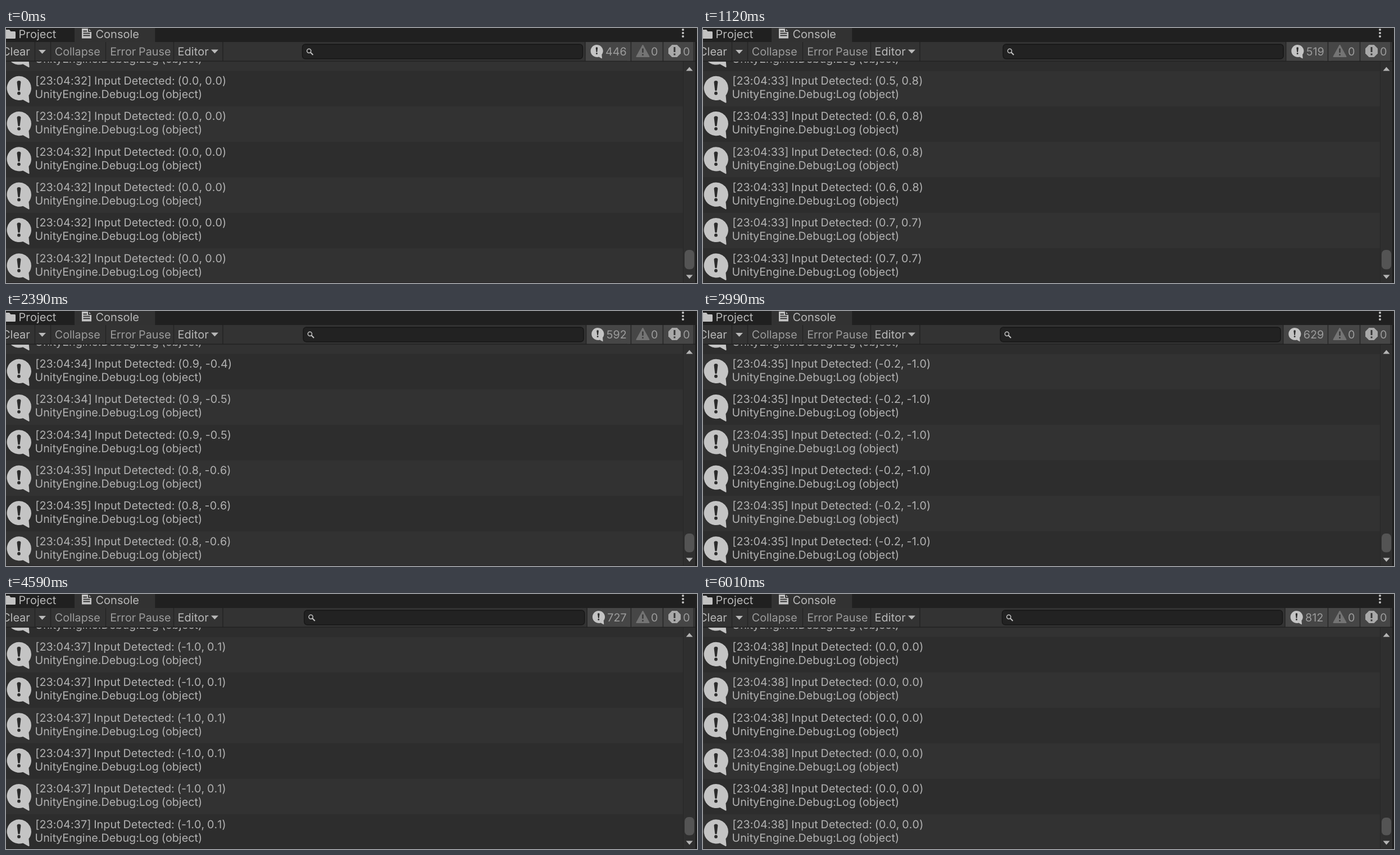
Animation of 1230 by 455 pixels, one loop 6270 ms. Source, as an HTML page:

```html
<!DOCTYPE html>
<html lang="en">
<head>
<meta charset="utf-8">
<title>Console</title>
<style>
  html, body { margin: 0; width: 100%; height: 100%; overflow: hidden; background: #2d2d2d; }
  svg { display: block; width: 1230px; height: 455px; }
  text {
    font-family: Inter, "Noto Sans", sans-serif;
    font-size: 20px;
    font-optical-sizing: none;
    font-kerning: none;
    font-feature-settings: "calt" 0;
    word-spacing: -0.8px;
    fill: #b9b9b9;
    white-space: pre;
    text-rendering: geometricPrecision;
  }
  .log text { font-size: 19.75px; fill: #b2b2b2; }
  .log .message { letter-spacing: 0.06px; }
  .dim text, text.dim { font-size: 19.8px; fill: #9c9c9c; }
</style>
</head>
<body>
<svg id="stage" viewBox="0 0 1230 455" xmlns="http://www.w3.org/2000/svg">
  <defs>
    <clipPath id="list"><rect x="0" y="60" width="1205" height="395"/></clipPath>
    <g id="bubble">
      <path fill="#c4c4c4" d="M0-21.7a22 21.6 0 0 1 17.5 34.6L18.6 25.2Q18.4 26.6 17 26L7.2 20.5A22 21.6 0 1 1 0-21.7z"/>
      <path fill="#2c2c2c" d="M-3.4-10.5Q-3.4-13.4 0-13.4T3.4-10.5L1.7 3.4Q1.5 4.6 0 4.6T-1.7 3.4z"/>
      <circle cy="9.1" r="2.9" fill="#2c2c2c"/>
    </g>
  </defs>
  <rect width="1230" height="455" fill="#2d2d2d"/>
  <g id="rows" class="log" clip-path="url(#list)"></g>
  <rect y="454" width="1230" height="1" fill="#262425"/>

  <!-- tabs -->
  <rect width="1230" height="25" fill="#202020"/>
  <path d="M122 25V0H265.300V25z" fill="#323232"/>
  <path d="M-2 3H6L8.500 6H15.500Q17 6 17 7.500V17.500Q17 19 15.500 19H-2z" fill="#c2c2c2"/>
  <text x="22.600" y="17.500">Project</text>
  <path d="M135 1H147L152 6V18.500H135z" fill="#c4c4c4"/>
  <path d="M147 0V6H153M137.500 5.500H144M137.500 9.500H149.500M137.500 13.500H149.500" fill="none" stroke="#323232" stroke-width="1.900"/>
  <text x="159.500" y="17.500">Console</text>
  <g fill="#c4c4c4"><circle cx="1205" cy="3" r="2"/><circle cx="1205" cy="9" r="2"/><circle cx="1205" cy="15" r="2"/></g>

  <!-- toolbar -->
  <rect y="25" width="1230" height="34" fill="#333"/>
  <rect y="58.500" width="1230" height="1.500" fill="#222"/>
  <text x="-7" y="49.200">Clear</text>
  <path d="M58 39H71L64.500 46z" fill="#b9b9b9"/>
  <g class="dim"><text x="86.700" y="49.200">Collapse</text><text x="185.200" y="49.200">Error Pause</text></g>
  <text x="305.600" y="49.200">Editor</text>
  <path d="M365 38.500H378L371.500 45.500z" fill="#b9b9b9"/>
  <path d="M51.500 25V59M79.500 25V59M177.500 25V59M298.500 25V59M386 25V59" stroke="#232323" stroke-width="1.300"/>

  <g id="search">
    <rect x="527.500" y="29" width="499" height="26" rx="5.500" fill="#222" stroke="#161616" stroke-width="1.400"/>
    <path d="M542 43.500L546.500 48" stroke="#c4c4c4" stroke-width="2"/>
    <circle cx="539.300" cy="40.800" r="3.600" fill="none" stroke="#c4c4c4" stroke-width="1.500"/>
    <path d="M1031 25H1112V58.500H1031z" fill="#464646"/>
    <path d="M1031 25V59" stroke="#232323" stroke-width="1.400"/>
    <use href="#bubble" transform="translate(1051.500 41) scale(.51)"/>
    <text id="count" class="dim" x="1067" y="49.200"></text>
  </g>
  <rect x="1106" y="25" width="117" height="33.500" fill="#464646"/>
  <path d="M1112.500 25V59M1169.500 25V59" stroke="#232323" stroke-width="1.400"/>
  <path d="M1133.500 31L1144.500 51H1122.500z" fill="#747474" stroke="#747474" stroke-width="2" stroke-linejoin="round"/>
  <path d="M1133.500 36.500V44M1133.500 46.500V49" stroke="#3a3a3a" stroke-width="2.600"/>
  <path d="M1185.500 30H1194.500L1201 36.500V45.500L1194.500 52H1185.500L1179 45.500V36.500z" fill="#a9a9a9"/>
  <path d="M1190 34V43M1190 45.500V48.500" stroke="#363636" stroke-width="3"/>
  <g class="dim"><text x="1148" y="49.200">0</text><text x="1205" y="49.200">0</text></g>

  <!-- scrollbar -->
  <rect x="1205" y="60" width="22" height="394" fill="#2f2f2f"/>
  <path d="M1205.500 60V454" stroke="#262626"/>
  <path d="M1210.500 76.500H1222.500L1216.500 69.500zM1210.500 440.500H1222.500L1216.500 447.500z" fill="#b4b4b4"/>
  <rect id="thumb" x="1208" width="17" rx="7" fill="#545454"/>
  <rect x="1227" y="25" width="3" height="430" fill="#1c1c1c"/>
</svg>
<script>
const LOOP = 6270, TICK = 200, FIRST = 446, PER_TICK = 12.2, PITCH = 63.3;
const POINT = 5 / 3; // pixels per layout point

const NS = "http://www.w3.org/2000/svg";
const $ = id => document.getElementById(id);

function add(parent, tag, attrs, content = "") {
  const el = document.createElementNS(NS, tag);
  for (const name in attrs) el.setAttribute(name, attrs[name]);
  el.textContent = content;
  return parent.appendChild(el);
}

const rows = [];
for (let i = -1; i < 6; i++) {
  const g = add($("rows"), "g", { transform: `translate(0 ${76.6 + i * PITCH})` });
  const back = add(g, "rect", { width: 1205, height: PITCH + 0.3 });
  add(g, "use", { href: "#bubble", transform: "translate(23 30.8)" });
  const line = add(g, "text", { class: "message", x: 52.2, y: 24.5 });
  add(g, "text", { x: 51.5, y: 48.6 }, "UnityEngine.Debug:Log (object)");
  rows.push({ back, line });
}

const ramp = (x, from, to) => Math.min(1, Math.max(0, (x - from) / (to - from)));
const fixed = v => v.toFixed(1).replace("-0.0", "0.0");

// The stick is pushed up, turned clockwise side by side, spun and let go.
function message(entry) {
  const push = ramp(entry, 458, 464) - ramp(entry, 784, 788);
  const turns = ramp(entry, 506, 540) + ramp(entry, 582, 612) + ramp(entry, 640, 664);
  const spin = 13 * Math.max(0, entry - 738.75);
  const angle = (79 - 89 * turns - spin) * Math.PI / 180;
  const second = 33 + Math.floor((entry - 470) / 60);
  const x = fixed(push * Math.cos(angle)), y = fixed(push * Math.sin(angle));
  return `[23:04:${second}] Input Detected: (${x}, ${y})`;
}

// Ticks are even apart from two short stalls.
function tickAt(t) {
  const stall = 70 * ramp(t, 2100, 2170) + 20 * ramp(t, 5390, 5410);
  return Math.floor((t + 80 - stall) / TICK);
}

let shown = -1;
function draw(time) {
  const tick = tickAt(time % LOOP);
  if (tick === shown) return;
  shown = tick;

  const count = FIRST + Math.round(tick * PER_TICK);
  rows.forEach(({ back, line }, i) => {
    const entry = count - 6 + i;
    back.setAttribute("fill", entry % 2 ? "#2d2d2d" : "#323232");
    line.textContent = message(entry);
  });

  // The counter button hugs its number, so the search field moves with it.
  $("count").textContent = count;
  const spare = 38 - $("count").getComputedTextLength();
  const shift = POINT * Math.max(0, Math.round(spare / POINT));
  $("search").setAttribute("transform", `translate(${shift.toFixed(2)} 0)`);

  const top = 396 + Math.floor((count - 400) / 130);
  $("thumb").setAttribute("y", top);
  $("thumb").setAttribute("height", 430.5 - top);
}

const start = performance.now();
function frame() {
  draw(performance.now() - start);
  requestAnimationFrame(frame);
}
frame();
</script>
</body>
</html>
```
